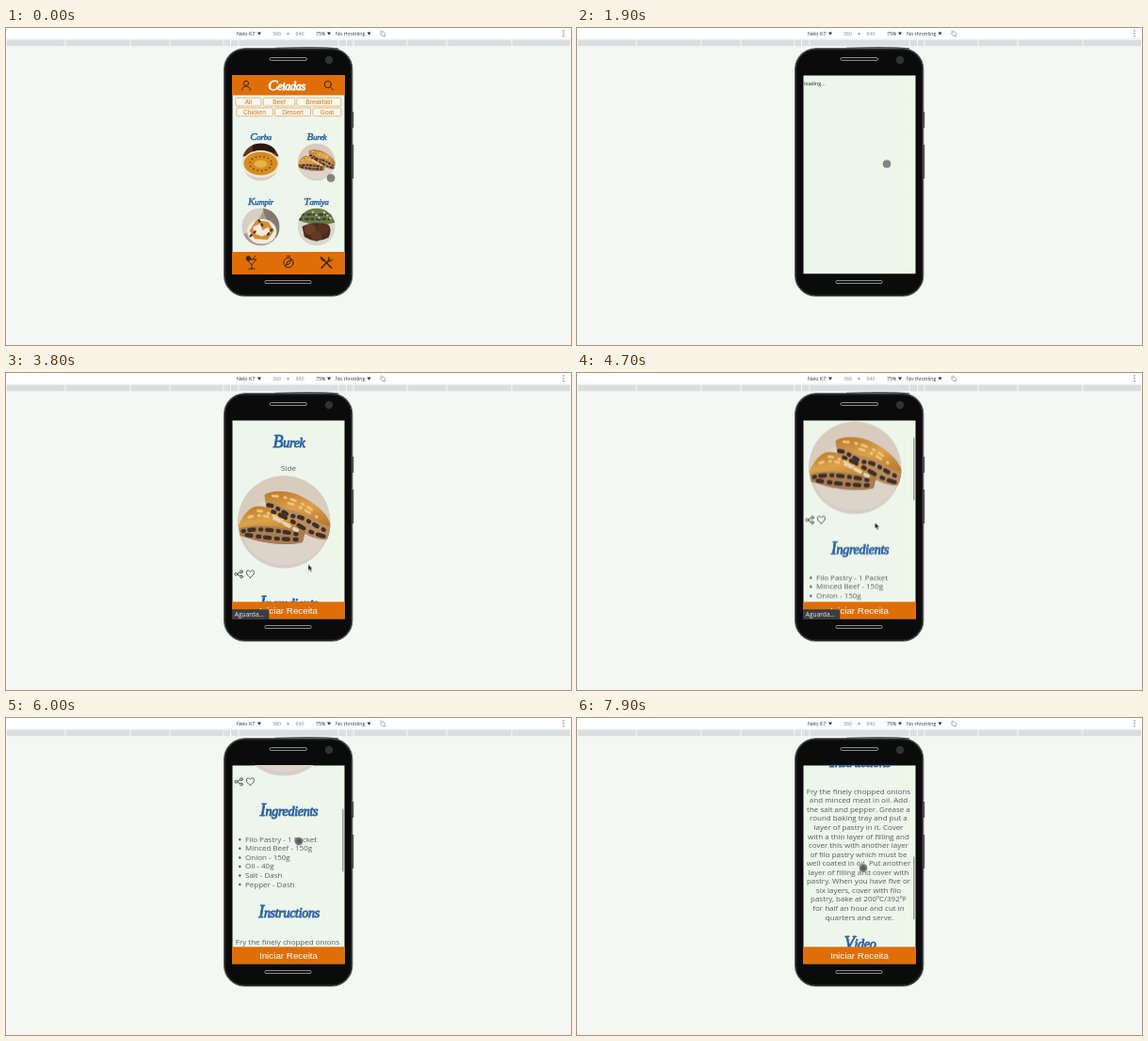
Recreate the animation shown at these times as an HTML page. Size 600 by 337 pixels, loop 8 s.

```html
<!DOCTYPE html>
<html lang="en">
<head>
<meta charset="utf-8">
<title>Recipe app demo</title>
<style>
  html, body { margin: 0; width: 100%; height: 100%; overflow: hidden; background: #f5f6f4; }
  svg { display: block; width: 100vw; height: 100vh; }
  text { font-family: "Open Sans", "Noto Sans", sans-serif; }
  .mid { text-anchor: middle; }
  .bar { font-size: 5.3px; fill: #303236; }
  .tag text, .start { font-family: "Liberation Sans", Arial, sans-serif; text-anchor: middle; }
  .tag text { font-size: 6.6px; fill: #df7413; }
  .tag rect { fill: #f9f8ef; stroke: #e58d3c; stroke-width: .6; }
  .copy { font-size: 8px; fill: #585b5d; }
  .script {
    font: italic 14px "Liberation Serif", "Noto Serif", serif; letter-spacing: -.3px;
    text-anchor: middle; fill: #2f64a3; stroke: #2f64a3; stroke-width: .9; stroke-linejoin: round;
  }
  .script tspan { font-size: 1.3em; }
  .small { font-size: 8.6px; letter-spacing: -.2px; stroke-width: .5; }
  .brand { font-size: 12px; fill: #fff; stroke: #fff; }
  .line { fill: none; stroke: #3b2512; stroke-width: 1; stroke-linecap: round; stroke-linejoin: round; }
  .grey { stroke: #4c5052; }
  .crumb { fill: none; stroke-linecap: round; }

  .home, .wait, .recipe, .status, .thumb, .touch, .arrow, .press { animation: 8s step-end infinite; }
  .home { animation-name: home; }
  .wait { animation-name: wait; }
  .recipe { animation-name: recipe; }
  .status { animation-name: status; }
  .thumb { animation-name: thumb; }
  .touch { animation-name: touch; }
  .arrow { animation-name: arrow; }
  .press { animation-name: press; }
  .scroll { animation: scroll 8s linear infinite; }
  .track { animation: track 8s linear infinite; }
  .pointer { animation: pointer 8s linear infinite; }

  @keyframes home { 0% { opacity: 1 } 22.5%, 100% { opacity: 0 } }
  @keyframes wait { 0% { opacity: 0 } 22.5% { opacity: 1 } 31.25%, 100% { opacity: 0 } }
  @keyframes recipe { 0% { opacity: 0 } 31.25%, 100% { opacity: 1 } }
  @keyframes status { 0% { opacity: 0 } 38.75% { opacity: 1 } 68.75%, 100% { opacity: 0 } }
  @keyframes thumb { 0% { opacity: 0 } 53.75%, 100% { opacity: 1 } }
  @keyframes touch { 0% { opacity: 1 } 38.75% { opacity: 0 } 68.75%, 100% { opacity: 1 } }
  @keyframes arrow { 0% { opacity: 0 } 38.75% { opacity: 1 } 68.75%, 100% { opacity: 0 } }
  @keyframes press { 0% { opacity: 0 } 71.25% { opacity: 1 } 78.75% { opacity: 0 } 95% { opacity: 1 } 100% { opacity: 0 } }
  @keyframes scroll {
    0%, 53.75% { transform: translateY(0) }
    58.75% { transform: translateY(-57.5px) }
    75% { transform: translateY(-146px) }
    87.5% { transform: translateY(-224px) }
    98.75%, 100% { transform: translateY(-306px) }
  }
  @keyframes track {
    0%, 53.75% { transform: translateY(0) }
    58.75% { transform: translateY(18.2px) }
    75% { transform: translateY(46.3px) }
    87.5% { transform: translateY(71px) }
    98.75%, 100% { transform: translateY(97px) }
  }
  @keyframes pointer {
    0%, 2.5% { transform: translate(345px, 159.5px) }
    22.5%, 31.25% { transform: translate(329px, 144.5px) }
    47.5%, 51.25% { transform: translate(321px, 203.5px) }
    53.75% { transform: translate(320px, 205px) }
    58.75% { transform: translate(316.5px, 159px) }
    75% { transform: translate(311px, 131px) }
    87.5% { transform: translate(302px, 165.5px) }
    98.75%, 100% { transform: translate(304px, 159.5px) }
  }
</style>
</head>
<body>
<svg viewBox="0 0 600 337" preserveAspectRatio="none">
  <defs>
    <clipPath id="screen"><rect x="240.5" y="50.5" width="119" height="210.8"/></clipPath>
    <clipPath id="disc"><circle r="50"/></clipPath>
    <linearGradient id="mint">
      <stop stop-color="#ecf6ed"/><stop offset="1" stop-color="#eff6ea"/>
    </linearGradient>
    <linearGradient id="cloth" x2=".4" y2="1">
      <stop stop-color="#d9cbbd"/><stop offset="1" stop-color="#d6cec5"/>
    </linearGradient>
    <linearGradient id="crust" x2=".3" y2="1">
      <stop stop-color="#b9782c"/><stop offset=".45" stop-color="#dba24a"/><stop offset="1" stop-color="#b06f26"/>
    </linearGradient>

    <g id="burek" clip-path="url(#disc)">
      <circle r="50" fill="url(#cloth)"/>
      <ellipse cx="1" cy="9" rx="45" ry="37" fill="#dcd3c9"/>
      <path d="M-21-29C-13-35 6-34 18-28C34-20 47-10 51 5L48 19C34 20 22 13 10 5L-18-9Z" fill="url(#crust)"/>
      <path d="M-20-24C-10-23-3-13 11-12C24-8 37 1 50 5L48 19C34 20 20 12 8 4L-16-8Z" fill="#b98c62"/>
      <path d="M-49 4C-44-8-36-17-28-17C-13-17 8-4 23 10L20 22C4 26-16 23-30 20L-47 15Z" fill="url(#crust)"/>
      <path d="M-48 7C-32 2-10 4 22 11L20 22C4 26-18 23-30 20L-47 15Z" fill="#a97c53"/>
      <g class="crumb" stroke="#3d2f28" stroke-width="4.5">
        <path d="M-17-18C-8-18 0-7 12-6S36 7 47 10" stroke-dasharray="4 7 1 6"/>
        <path d="M-12-11C0-6 10 0 18 5S38 15 46 16" stroke-dasharray="2 6 7 8"/>
        <path d="M-44 10C-28 6-8 9 18 14" stroke-dasharray="1 6 5 7"/>
        <path d="M-40 14C-26 16-6 19 16 19" stroke-dasharray="5 7 2 6"/>
      </g>
      <g class="crumb" stroke="#efc27a" stroke-width="3">
        <path d="M-12-28C4-27 18-22 30-13M5-20C16-18 26-10 36-5" stroke-dasharray="5 8 1 6"/>
        <path d="M-38-5C-24-10-10-4 4 3M-28-12C-18-11-10-6-2-2" stroke-dasharray="4 7 1 5"/>
      </g>
      <path class="crumb" d="M-10-4C0 1 6 5 14 9" stroke="#e6d2bb" stroke-width="4" stroke-dasharray="6 6"/>
    </g>

    <g id="soup" clip-path="url(#disc)">
      <circle r="50" fill="#eadfce"/>
      <path d="M-50-50H50V-15H-50Z" fill="#62351c"/>
      <path d="M-22-50H38V-25H-22Z" fill="#2b1710"/>
      <ellipse cy="6" rx="50" ry="37" fill="#f0e6d6"/>
      <ellipse cy="4" rx="45" ry="31" fill="#d58c1f"/>
      <ellipse cy="4" rx="29" ry="19" fill="none" stroke="#7a4712" stroke-width="4" stroke-dasharray="4 7"/>
      <ellipse cy="5" rx="17" ry="10" fill="#e7b34a"/>
      <path d="M-42 27Q0 57 42 27L30 50H-30Z" fill="#d9cfc1"/>
    </g>

    <g id="potato" clip-path="url(#disc)">
      <circle r="50" fill="#a99e8f"/>
      <path d="M-50-50H10L-20 10-50 20Z" fill="#d8d0c4"/>
      <path d="M5-50H50V40Q20 5 5-50" fill="#83796d"/>
      <ellipse cx="3" cy="12" rx="39" ry="33" fill="#efebe2"/>
      <path d="M-30 10L-12-18 20-14 36 10 18 34-16 32Z" fill="#d58d36"/>
      <path d="M-20 0L-2-9 5 9 20 0 26 17 2 25-18 16Z" fill="#f3ebdd"/>
      <path class="crumb" d="M-27 24L-10 8M-5-18L5-3M19 20L31 5" stroke="#493a24" stroke-width="6" stroke-dasharray="4 9"/>
    </g>

    <g id="patties" clip-path="url(#disc)">
      <circle r="50" fill="#d8d7d0"/>
      <path d="M-50-50H50V-12Q0 2-50-18Z" fill="#6c7848"/>
      <path class="crumb" d="M-38-33H42M-44-21H34" stroke="#38482b" stroke-width="7" stroke-dasharray="4 11 7 9"/>
      <path class="crumb" d="M-10-40L12-20M20-39L38-22" stroke="#bfc69f" stroke-width="5" stroke-dasharray="2 9"/>
      <path d="M-38-1Q-10-17 31-7Q43 7 32 28Q0 46-32 26Z" fill="#4c2c1d"/>
      <circle cx="-17" cy="7" r="15" fill="#6a402a"/>
      <circle cx="17" cy="5" r="15" fill="#59331f"/>
      <circle cy="24" r="14" fill="#633923"/>
    </g>
  </defs>

  <rect width="600" height="337" fill="#f5f7f4"/>
  <rect width="600" height="12" fill="#fff"/>
  <path d="M0 12H600" stroke="#e3e4e5" stroke-width=".6"/>
  <path d="M1 16H600" stroke="#dcdddf" stroke-width="6.6"/>
  <path d="M63 12V20M132 12V20M174 12V20M231 12V20M238.5 12V20M247 12V20M353 12V20M361.5 12V20M369 12V20M426 12V20M468 12V20M537 12V20M599.5 12V20"
    stroke="#f8f8f8"/>
  <g class="bar">
    <text x="245" y="8">Nelo K7</text>
    <text x="283" y="8" fill="#85888b">360</text>
    <text x="298" y="8">×</text>
    <text x="307.5" y="8" fill="#85888b">640</text>
    <text x="329" y="8">75%</text>
    <text x="350" y="8">No throttling</text>
    <path d="M267 4.5h4l-2 3.2zM341 4.5h4l-2 3.2zM383.5 4.5h4l-2 3.2z"/>
    <path d="M397.5 6l2.5-2.5 3 3-2.5 2.5zM397.5 3.8l1.5-1M403 8.3l-1.5 1" fill="none" stroke="#777" stroke-width=".7"/>
    <path d="M592 3v6" fill="none" stroke="#555" stroke-width="1.3" stroke-linecap="round" stroke-dasharray="0 2.7"/>
  </g>

  <path d="M368 89V106M368 124V160" stroke="#4d5052" stroke-width="2.4"/>
  <path d="M286 21.5Q330 19.5 353 22" fill="none" stroke="#55585a" stroke-width="1.4"/>
  <rect x="231.7" y="21.8" width="136" height="263.2" rx="22" fill="#0a0b0a" stroke="#505354" stroke-width="1.2"/>
  <rect x="233" y="23" width="133.5" height="260.8" rx="20.5" fill="none" stroke="#222423"/>
  <g fill="#101110" stroke="#a9abac" stroke-width=".8">
    <rect x="280" y="31.5" width="39.5" height="3" rx="1.5"/>
    <rect x="275" y="268.5" width="49" height="3" rx="1"/>
  </g>
  <circle cx="343" cy="34" r="4.2" fill="#303332"/>

  <g clip-path="url(#screen)">
    <rect x="240" y="50" width="120" height="212" fill="url(#mint)"/>

    <g class="home">
      <path d="M240 50H360V71.5H240ZM240 238H360V262H240Z" fill="#e06e08"/>
      <g class="line">
        <circle cx="255" cy="58.8" r="2.6"/>
        <path d="M250.5 66q.5-4 4.5-4t4.5 4"/>
        <circle cx="341.8" cy="60" r="3.6"/>
        <path d="M344.5 62.7L347.5 65.8"/>
      </g>
      <text class="script brand" x="298" y="65.5"><tspan>C</tspan>eiadas</text>

      <g class="tag">
        <rect x="243.8" y="74.3" width="27" height="8.7" rx="1.5"/><text x="257.3" y="81">All</text>
        <rect x="273.2" y="74.3" width="33.6" height="8.7" rx="1.5"/><text x="290" y="81">Beef</text>
        <rect x="308.8" y="74.3" width="47" height="8.7" rx="1.5"/><text x="332.3" y="81">Breakfast</text>
        <rect x="244.8" y="85" width="38.5" height="8.7" rx="1.5"/><text x="264" y="91.7">Chicken</text>
        <rect x="285.5" y="85" width="38" height="8.7" rx="1.5"/><text x="304.5" y="91.7">Dessert</text>
        <rect x="326" y="85" width="29.8" height="8.7" rx="1.5"/><text x="341" y="91.7">Goat</text>
      </g>

      <text class="script small" x="270.5" y="118.5"><tspan>C</tspan>orba</text>
      <text class="script small" x="330" y="118.5"><tspan>B</tspan>urek</text>
      <text class="script small" x="270.5" y="188"><tspan>K</tspan>umpir</text>
      <text class="script small" x="329.5" y="188"><tspan>T</tspan>amiya</text>
      <use href="#soup" transform="translate(270.5 142.5) scale(.4)"/>
      <use href="#burek" transform="translate(329.7 142.5) scale(.4)"/>
      <use href="#potato" transform="translate(270.5 211.5) scale(.4)"/>
      <use href="#patties" transform="translate(329.7 211.5) scale(.4)"/>

      <g class="line">
        <path d="M256 246h10l-5 5.5zM261 251.5v4.5M258 256h6M262 246l3-4"/>
        <circle cx="257.5" cy="245" r="2.3" fill="#3b2512"/>
        <circle cx="300" cy="249.5" r="5.2"/>
        <path d="M298.5 242.5h3M303 246.5l-2 4-4 2 2-4z"/>
        <path d="M335 255L344 246M336 245l9.5 10" stroke-width="1.6"/>
        <path d="M343 243.5l-1 3.5 2.5 1.5 2.5-2.5M334.5 243.5q-1 3 2.5 4z"/>
      </g>
    </g>

    <text class="wait" x="241.2" y="60.5" font-size="5.2" fill="#171918">loading...</text>

    <g class="recipe">
      <g class="scroll">
        <text class="script" x="300.5" y="78.5"><tspan>B</tspan>urek</text>
        <text class="copy mid" x="300" y="104">Side</text>
        <use href="#burek" transform="translate(295.2 158.3) scale(.988)"/>
        <g class="line grey">
          <path d="M244.8 213.8L249.3 211.5M244.8 213.8L249.3 216.2"/>
          <g fill="#edf6ec">
            <circle cx="244.3" cy="213.8" r="1.4"/>
            <circle cx="250" cy="211.2" r="1.4"/>
            <circle cx="250" cy="216.5" r="1.4"/>
          </g>
          <path d="M259.4 217.5C252 212.5 256 207.5 259.4 211.3C262.8 207.5 266.8 212.5 259.4 217.5Z"/>
        </g>

        <text class="script" x="300.5" y="249.5"><tspan>I</tspan>ngredients</text>
        <path d="M248.3 275.3v48" stroke="#55585a" stroke-width="2.5" stroke-linecap="round" stroke-dasharray="0 9.55"/>
        <text class="copy" y="268.25">
          <tspan x="254" dy="9.55">Filo Pastry - 1 Packet</tspan>
          <tspan x="254" dy="9.55">Minced Beef - 150g</tspan>
          <tspan x="254" dy="9.55">Onion - 150g</tspan>
          <tspan x="254" dy="9.55">Oil - 40g</tspan>
          <tspan x="254" dy="9.55">Salt - Dash</tspan>
          <tspan x="254" dy="9.55">Pepper - Dash</tspan>
        </text>

        <text class="script" x="300.5" y="358"><tspan>I</tspan>nstructions</text>
        <text class="copy mid" y="377.25">
          <tspan x="300" dy="9.55">Fry the finely chopped onions</tspan>
          <tspan x="300" dy="9.55">and minced meat in oil. Add</tspan>
          <tspan x="300" dy="9.55">the salt and pepper. Grease a</tspan>
          <tspan x="300" dy="9.55">round baking tray and put a</tspan>
          <tspan x="300" dy="9.55">layer of pastry in it. Cover</tspan>
          <tspan x="300" dy="9.55">with a thin layer of filling and</tspan>
          <tspan x="300" dy="9.55">cover this with another layer</tspan>
          <tspan x="300" dy="9.55">of filo pastry which must be</tspan>
          <tspan x="300" dy="9.55">well coated in oil. Put another</tspan>
          <tspan x="300" dy="9.55">layer of filling and cover with</tspan>
          <tspan x="300" dy="9.55">pastry. When you have five or</tspan>
          <tspan x="300" dy="9.55">six layers, cover with filo</tspan>
          <tspan x="300" dy="9.55">pastry, bake at 200ºC/392ºF</tspan>
          <tspan x="300" dy="9.55">for half an hour and cut in</tspan>
          <tspan x="300" dy="9.55">quarters and serve.</tspan>
        </text>
        <text class="script" x="300.5" y="551"><tspan>V</tspan>ideo</text>
      </g>

      <rect x="240" y="243.3" width="120" height="18.2" fill="#e06e08"/>
      <text class="start" x="300" y="255.8" font-size="9.8" fill="#fff">Iniciar Receita</text>
      <g class="thumb"><rect class="track" x="357" y="50.3" width="1.6" height="67" rx=".8" fill="#9da29e"/></g>
      <g class="status">
        <path d="M240 251.3H277.5Q279.3 251.3 279.3 253V262H240Z" fill="#3b3d40"/>
        <text x="242.8" y="258.7" font-size="6.6" fill="#e9eaeb">Aguarda…</text>
      </g>
    </g>
  </g>

  <g class="pointer">
    <g class="touch">
      <circle r="4" fill="#737674" fill-opacity=".88" stroke="#606361" stroke-width=".5"/>
      <circle class="press" r="2.6" fill="#444746" fill-opacity=".7"/>
    </g>
    <path class="arrow" d="M0 0V6.5L1.5 5.2 2.6 7.7 3.7 7.2 2.6 4.8H4.6Z" fill="#161718" stroke="#f2f3f1" stroke-width=".4"/>
  </g>
</svg>
</body>
</html>
```
